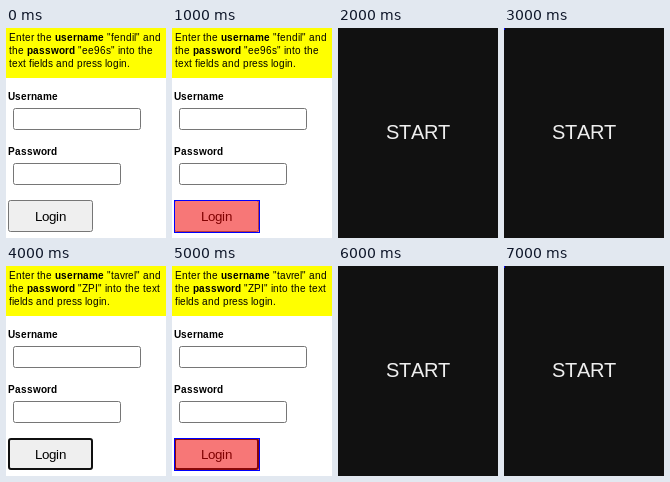
Animation, 160 px wide and 210 px high, one loop 8000 ms. Source, as an HTML page:

```html
<!DOCTYPE html>
<html lang="en">
<head>
<meta charset="utf-8">
<title>Login task</title>
<style>
html, body { margin: 0; width: 100%; height: 100%; overflow: hidden; background: #fff; }
body { font: 10px/13px "Liberation Sans", Arial, sans-serif; font-kerning: none; color: #000; }
div { position: absolute; box-sizing: border-box; white-space: pre; }
[hidden] { display: none; }
#query { left: 0; top: 0; width: 160px; height: 50px; padding: 3px; background: #ff0; }
.label { left: 2px; font-weight: bold; }
.field { left: 7px; height: 22px; border: 1px solid #767676; border-radius: 2.5px; }
#login {
  left: 2px; top: 172px; width: 85px; height: 32px;
  border: 1px solid #767676; border-radius: 2.5px; background: #efefef;
  font-size: 13.333px; line-height: 32px; text-align: center;
}
#login.focused { border: 2px solid #101010; border-radius: 3px; line-height: 30px; }
#press {
  left: 2px; top: 172px; width: 86px; height: 33px;
  border: 1px solid #00f; background: rgba(255, 0, 0, .5) padding-box;
}
#cover {
  left: 0; top: 0; width: 160px; height: 210px; background: #111; color: #eee;
  font-size: 20px; line-height: 208px; text-align: center;
}
#corner { left: 0; top: 0; width: 1px; height: 2px; background: #00f; }
</style>
</head>
<body>
<div id="query"></div>
<div class="label" style="top:62px">Username</div>
<div class="field" style="top:80px;width:128px"></div>
<div class="label" style="top:117px">Password</div>
<div class="field" style="top:135px;width:108px"></div>
<div id="login">Login</div>
<div id="press"></div>
<div id="cover">START<div id="corner"></div></div>
<script>
const el = id => document.getElementById(id);
const pen = document.createElement("canvas").getContext("2d");
const task = (user, pass, ending) =>
  `Enter the <b>username</b> "${user}" and\nthe <b>password</b> "${pass}" into the${ending}`;
const tasks = [
  task("fendil", "ee96s", "\ntext fields and press login."),
  task("tavrel", "ZPI", " text\nfields and press login.")
];
let shown = -1;

// Rounds every letter's advance to whole pixels, like hinted text.
function snap(node) {
  if (node.nodeType !== Node.TEXT_NODE) return [...node.childNodes].forEach(snap);
  const { fontWeight, fontSize, fontFamily } = getComputedStyle(node.parentNode);
  pen.font = `${fontWeight} ${fontSize} ${fontFamily}`;
  node.replaceWith(...[...node.data].map(letter => {
    const span = document.createElement("span");
    const width = pen.measureText(letter).width;
    span.textContent = letter;
    span.style.letterSpacing = `${Math.round(width) - width}px`;
    return span;
  }));
}

// Each task takes four one-second steps: form, press, cover, cover with corner.
function draw(now) {
  const second = Math.floor(now / 1000) % 8;
  if (second !== shown) {
    shown = second;
    const round = second >> 2, step = second % 4;
    el("query").innerHTML = tasks[round];
    snap(el("query"));
    el("login").className = round ? "focused" : "";
    el("press").hidden = step !== 1;
    el("cover").hidden = step < 2;
    el("corner").hidden = step !== 3;
  }
  requestAnimationFrame(() => draw(performance.now()));
}

document.querySelectorAll(".label, #login, #cover").forEach(snap);
draw(performance.now());
</script>
</body>
</html>
```
